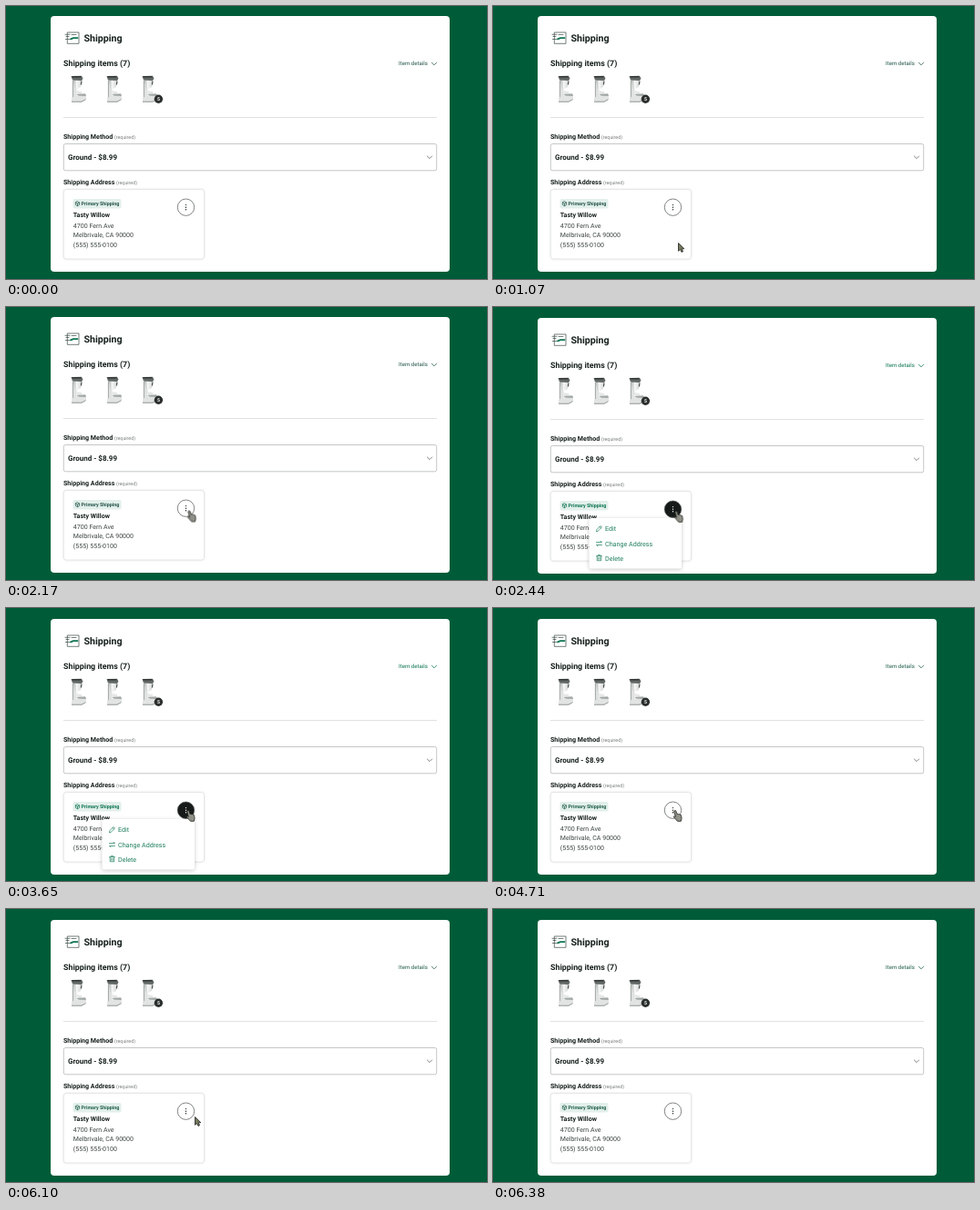
Animation, 528 px wide and 300 px high, one loop 6970 ms. Source, as an HTML page:

```html
<!DOCTYPE html>
<html lang="en">
<head>
<meta charset="utf-8">
<title>Shipping</title>
<style>
  html, body { margin: 0; width: 100%; height: 100%; overflow: hidden; background: #005c38; }
  svg { display: block; width: 528px; height: 300px; }
  text { font-family: Roboto, "Liberation Sans", sans-serif; fill: #17211e; text-rendering: geometricPrecision; }
  .medium { font-weight: 500; }
  .strong { font-weight: 600; }
  .bold { font-weight: 700; }
  .label { font-size: 7.1px; font-weight: 600; }
  .hint { font-size: 5.3px; fill: #747b78; }
  .line { font-size: 7.05px; fill: #3b4441; }
  .stroke { fill: none; stroke-linecap: round; stroke-linejoin: round; }
  .accent { color: #24544a; }
  .accent text, .menu text { fill: currentColor; }
  .accent .stroke, .menu .stroke { stroke: currentColor; }
  .menu { color: #1c7d5b; visibility: hidden; }
  .menu text { font-size: 7.15px; }
  .sheet { filter: drop-shadow(0 1px 2px rgba(0, 0, 0, .22)); }
  .card { filter: drop-shadow(0 .5px .8px rgba(0, 0, 0, .1)); }
  .hand, .arrow { fill: #8f9087; stroke: #20241f; stroke-width: .8; stroke-linejoin: round; }
  .arrow { fill: #77795f; }
  .hand { visibility: hidden; }

  .page, .accent, .menu, .ring, .dots, .cursor, .hand, .arrow {
    animation: 6970ms step-end infinite;
  }
  .page { animation-name: nudge; }
  .accent { animation-name: tint; }
  .menu { animation-name: menu; }
  .ring { animation-name: ring; }
  .dots { animation-name: dots; }
  .cursor { animation-name: travel; }
  .hand { animation-name: hand; }
  .arrow { animation-name: arrow; }

  @keyframes nudge {
    0% { transform: none; }
    35%, 100% { transform: translateY(1px); }
  }
  @keyframes tint {
    0% { color: #24544a; }
    35% { color: #0c7450; }
    66.57%, 100% { color: #1f5e4b; }
  }
  @keyframes menu {
    0% { visibility: hidden; }
    35% { visibility: visible; }
    66.57%, 100% { visibility: hidden; }
  }
  @keyframes ring {
    0% { fill: #fff; }
    35% { fill: #161a19; }
    66.57% { fill: #e4e6e5; }
    67.57%, 100% { fill: #fff; }
  }
  @keyframes dots {
    0% { fill: #17211e; }
    35% { fill: #fff; }
    66.57%, 100% { fill: #17211e; }
  }
  @keyframes travel {
    0% { transform: translate(190px, 320px); }
    11.47% { transform: translate(189px, 295px); animation-timing-function: steps(4, end); }
    15.35% { transform: translate(203px, 260px); animation-timing-function: steps(3, end); }
    18.36% { transform: translate(202px, 239px); animation-timing-function: steps(3, end); }
    21.37% { transform: translate(200px, 227px); }
    22.38% { transform: translate(199.5px, 225.5px); }
    28.12% { transform: translate(199.5px, 224.5px); }
    29.12% { transform: translate(199.5px, 224px); }
    31.13% { transform: translate(199.2px, 223.5px); }
    35% { transform: translate(199.2px, 224px); }
    42.75% { transform: translate(199px, 223.2px); }
    52.36% { transform: translate(198px, 222px); }
    87.51% { transform: translate(207px, 228px); animation-timing-function: steps(4, end); }
    91.53%, 100% { transform: translate(407px, 320px); }
  }
  @keyframes hand {
    0% { visibility: hidden; }
    22.38% { visibility: visible; }
    87.51%, 100% { visibility: hidden; }
  }
  @keyframes arrow {
    0% { visibility: visible; }
    22.38% { visibility: hidden; }
    87.51%, 100% { visibility: visible; }
  }
</style>
</head>
<body>
<svg viewBox="0 0 528 300">
  <defs>
    <linearGradient id="steel">
      <stop offset="0" stop-color="#aab0ad"/>
      <stop offset=".4" stop-color="#f6f7f6"/>
      <stop offset="1" stop-color="#d3d6d4"/>
    </linearGradient>
    <g id="brewer">
      <path d="M73 82l4.500 1v16l-4 3z" fill="#dfe2e0"/>
      <path d="M73.400 82v19" stroke="#8d9390" stroke-width=".8"/>
      <path d="M74 81h9l-1 8-4.500 2.500-2-1z" fill="url(#steel)"/>
      <path d="M71.500 77l11.500-.3 1.500 3-1.500 2.300-10-.5z" fill="#626865"/>
      <path d="M72.500 77.800h10" stroke="#252a28" stroke-width="1.200"/>
      <path d="M83 82.500l-.6 4" stroke="#454b48" stroke-width="1.200"/>
      <path d="M77 93l6 1 .5 2.500-5 1.500z" fill="#e6e8e7"/>
      <path d="M77.500 97l9.500-.8 1.200 2.300-6 2.500z" fill="#a3a9a6"/>
      <path d="M72 101l5-2.500 11 .5v3.500L83 105.500H72z" fill="#e1e4e2"/>
      <path d="M72 105.200h11l4.500-2.500" fill="none" stroke="#7b817e" stroke-width=".8"/>
    </g>
    <path id="chevron" d="M-2.600-1.300L0 1.300 2.600-1.300"/>
  </defs>

  <g class="page">
    <rect x="49" y="11" width="438" height="281" rx="4" fill="#fff"/>

    <g class="stroke" stroke="#43534d" stroke-width=".75">
      <path d="M67.700 29h12.300v12.300H67.700zM65 31.300h5M66 33.500h3M65.500 36.500h4"/>
      <path d="M72 31.500h5"/>
      <path d="M71 36.300l3-1.200h4.500" stroke="#0c7450" stroke-width="1.800"/>
    </g>
    <text class="strong" x="85.500" y="39" font-size="10.600">Shipping</text>
    <text class="strong" x="63" y="66" font-size="8.900">Shipping items (7)</text>

    <g class="accent">
      <text x="431" y="65.300" font-size="6.100">Item details</text>
      <use class="stroke" href="#chevron" x="470" y="63.500" stroke-width=".8"/>
    </g>

    <use href="#brewer"/>
    <use href="#brewer" x="39"/>
    <use href="#brewer" x="78"/>
    <circle cx="167.400" cy="102.300" r="4.700" fill="#2b302e"/>
    <text class="bold" x="167.400" y="104.200" font-size="5.200" text-anchor="middle" style="fill:#fff">5</text>

    <path d="M63 122.500h410" stroke="#e0e3e1"/>

    <text class="label" x="63" y="145.700">Shipping Method</text>
    <text class="hint" x="119" y="145.700">(required)</text>
    <rect x="63.300" y="151.500" width="409.400" height="29.300" rx="2" fill="#fff" stroke="#b4b9b6" stroke-width=".8"/>
    <text class="strong" x="68" y="169" font-size="8">Ground - $8.99</text>
    <use class="stroke" href="#chevron" x="465" y="166.300" stroke="#5b6461" stroke-width=".8"/>

    <text class="label" x="63" y="195.700">Shipping Address</text>
    <text class="hint" x="121" y="195.700">(required)</text>
    <rect class="card" x="63.300" y="201.500" width="154.200" height="76.500" rx="3" fill="#fff" stroke="#dfe2e0" stroke-width=".8"/>

    <g class="accent">
      <rect x="73.500" y="212" width="53" height="10.500" rx="2" fill="#e2efea"/>
      <path class="stroke" d="M78.500 214.800l2.100 1.200v2.500l-2.100 1.200-2.100-1.200V216zM76.400 216l2.100 1.200 2.100-1.200M78.500 217.200v2.300" stroke-width=".7"/>
      <text class="strong" x="82.500" y="219.200" font-size="5.400">Primary Shipping</text>
    </g>

    <text class="bold" x="73.800" y="232" font-size="7.100">Tasty Willow</text>
    <text class="line" x="73.800" y="243.500">4700 Fern Ave</text>
    <text class="line" x="73.800" y="254.400">Melbrivale, CA 90000</text>
    <text class="line" x="73.800" y="265.300">(555) 555-0100</text>

    <circle class="ring" cx="197.500" cy="221.200" r="9.200" fill="#fff" stroke="#4c5451" stroke-width=".7"/>
    <g class="dots">
      <circle cx="197.500" cy="218.600" r=".7"/>
      <circle cx="197.500" cy="221.200" r=".7"/>
      <circle cx="197.500" cy="223.800" r=".7"/>
    </g>

    <g class="menu">
      <rect class="sheet" x="105.500" y="231" width="101.500" height="55.500" rx="2.500" fill="#fff"/>
      <g class="stroke" stroke-width=".7">
        <path d="M113.500 245.500l.5-2 4-4 1.500 1.500-4 4zM117 240.500l1.500 1.500"/>
        <path d="M113.500 257.500h6l-1.300-1.300M119.500 260.500h-6l1.300 1.300"/>
        <path d="M113.500 272.700h6M115.300 272.500v-1h2.400v1M114.200 273v4.700h4.600V273M115.700 274.300v2M117.300 274.300v2"/>
      </g>
      <text x="123" y="245.300">Edit</text>
      <text x="123" y="261.500">Change Address</text>
      <text x="123" y="277.800">Delete</text>
    </g>
  </g>

  <g class="cursor">
    <path class="arrow" d="M.5.500v8.800l2-1.800 1.500 3 1.600-.8-1.400-2.900h2.700z"/>
    <path class="hand" d="M1.500.600c.8-.3 1.400.2 1.600.9l.9 3 .9-.3.8.5.9-.2.700.7.9 0 .5 1.200.4 2.900-.8 3H4.500L2 9.500.300 7.600c0-.9.900-1.200 1.600-.6l.5.400L.800 1.900C.600 1.300.900.800 1.500.600z"/>
  </g>
</svg>
</body>
</html>
```
